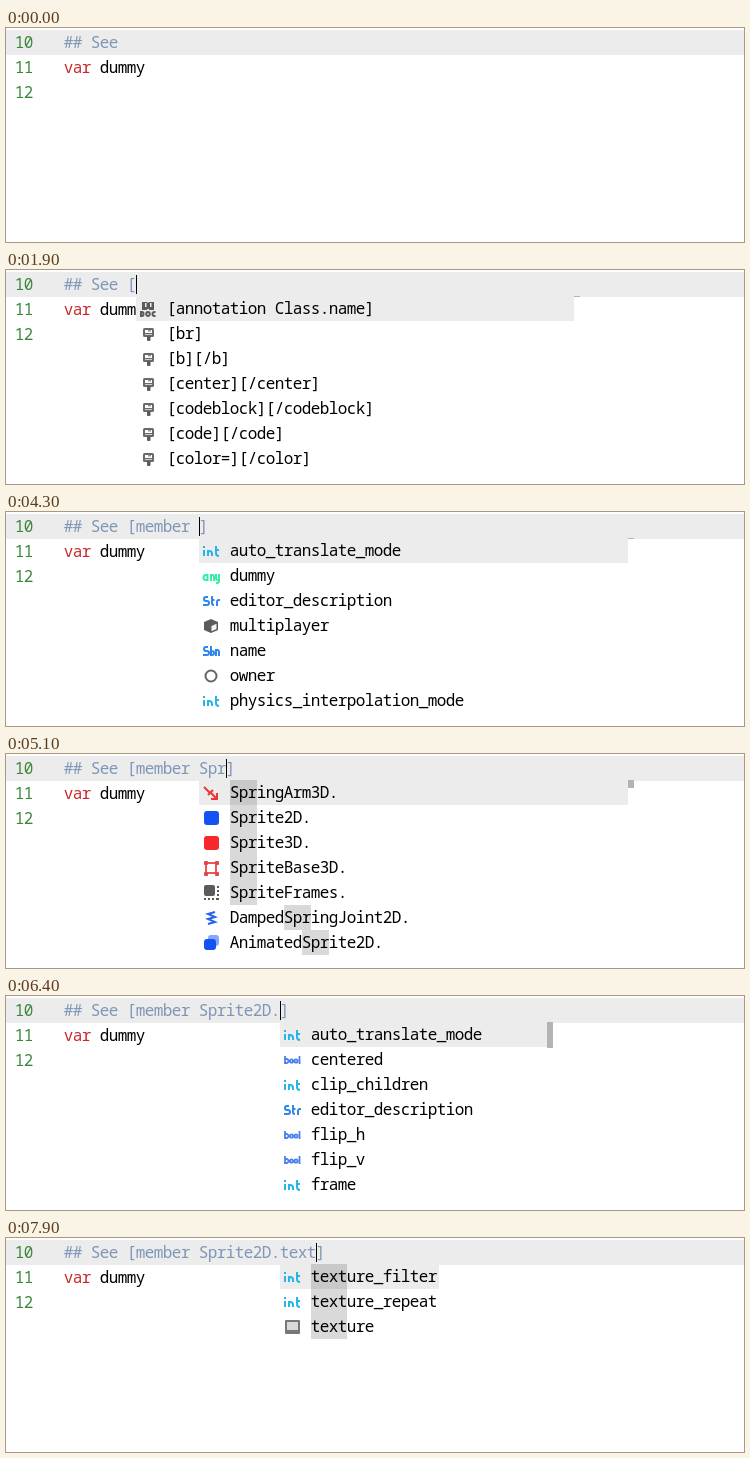
Recreate the animation shown at these times as an HTML page with a canvas. Size 738x214 px, loop 8 s.

```html
<!DOCTYPE html>
<html lang="en">
<head>
<meta charset="utf-8">
<title>Code completion</title>
<style>
html, body { margin: 0; width: 738px; height: 214px; overflow: hidden; background: #fff; }
canvas { display: block; }
</style>
</head>
<body>
<canvas id="stage" width="738" height="214"></canvas>
<script>
const ctx = document.getElementById('stage').getContext('2d');
const LOOP = 8000, CHAR = 9, ROW = 25, LEFT = 58, TOP = 26;
const FONT = 'semi-condensed 16px "Noto Sans Mono", monospace';
const GREY = '#5b5b5b', CYAN = '#25b5e8', BLUE = '#2f86ee', SPRITE = '#1552f5', RED = '#f8272b';

function rect(color, x, y, w, h, r = 0) {
  ctx.fillStyle = color;
  ctx.beginPath();
  ctx.roundRect(x, y, w, h, r);
  ctx.fill();
}
function line(color, d, width = 2) {
  ctx.strokeStyle = color;
  ctx.lineWidth = width;
  ctx.stroke(new Path2D(d));
}
function fill(color, d) {
  ctx.fillStyle = color;
  ctx.fill(new Path2D(d));
}
// Editor text sits on a grid of one cell per character.
function write(text, x, y, color = '#000') {
  ctx.font = FONT;
  ctx.letterSpacing = '0px';
  const spacing = CHAR - ctx.measureText('0').width;
  ctx.letterSpacing = spacing + 'px';
  ctx.fillStyle = color;
  ctx.fillText(text, x + spacing / 2, y);
}

// Each icon fills a 16 by 16 box.
const icons = {
  doc() {
    fill(GREY, 'M2 1h5l1 1 1-1h5v8H9.500L8 7.500 6.500 9H2z');
    rect('#eee', 5, 2, 1.5, 4);
    rect('#eee', 10, 2, 1.5, 4);
    line(GREY, 'M1 11v4h1a1.500 2 0 0 0 0-4zM6.200 13a1.800 2 0 1 0 3.600 0a1.800 2 0 1 0-3.600 0M15.500 11h-1a2 2 0 0 0 0 4h1');
  },
  tag() {
    rect('#6a6a6a', 3, 2, 11, 9, 1.5);
    rect('#fff', 5, 4, 7, 3);
    rect('#999', 8, 4, 3, 1.5);
    rect('#ccc', 5, 8, 7, 1);
    rect(GREY, 7, 10, 3.5, 5, 1);
  },
  cube() {
    fill(GREY, 'M8 1l7 3v8l-7 3-7-3V4z');
    fill('#f4f4f4', 'M8.500 8l5-2.200v5.200l-5 2.200z');
  },
  volume() {
    line(GREY, 'M2 5l3-3h9v9l-3 3H2zM2 5h9v9M11 5l3-3', 1.6);
    fill(GREY, 'M3 13l2.500-4 2 2 1.500-3 1.500 5z');
  },
  int: () => line(CYAN, 'M1 7v6M1 3v2M5 13V8h1a3 3 0 0 1 3 3v2M13 3v7a3 3 0 0 0 3 3M13 7h3'),
  any: () => line('#35eda5', 'M4.500 6v6H3a2 2 0 0 1 0-5H5M8 13V7h1a2 2 0 0 1 2 2v4M13 6v4a2 2 0 0 0 2 2h1M16 6v7a2 2 0 0 1-2 2h-1'),
  str: () => line(BLUE, 'M5 4H3a1.800 1.800 0 0 0 0 4h1a2 2 0 0 1 0 4H0M9 3v7a2 2 0 0 0 2 2M9 7h2.500M14 13V9a2 2 0 0 1 2-2h1'),
  name: () => line(BLUE, 'M5 4H3a1.800 1.800 0 0 0 0 4h1a2 2 0 0 1 0 4H0M8 3v9h1a2 2 0 0 0 0-4H8M13 13V7h1a2 2 0 0 1 2 2v4'),
  bool: () => line('#4b80ed', 'M1 4v7h1.500a1.800 1.800 0 0 0 0-4H1M6 9a1.500 1.700 0 1 0 3 0a1.500 1.700 0 1 0-3 0M10.500 9a1.500 1.700 0 1 0 3 0a1.500 1.700 0 1 0-3 0M15.500 4v7h1', 1.8),
  t2d() {
    line('#7aec2c', 'M0 4h5M2.500 4v9');
    line('#4fb84b', 'M6 4h2a2 2 0 0 1 1 3.500L6.500 12H10');
    line('#a5f52d', 'M12 4v8h1a3.500 4 0 0 0 0-8z');
  },
  prop() {
    rect('#777', 3, 11, 2, 2);
    line('#555', 'M8.500 13V5h2a2 2 0 0 1 0 4.500h-2');
  },
  ring: () => line('#666', 'M2.500 8a5.500 5.500 0 1 0 11 0a5.500 5.500 0 1 0-11 0'),
  texture() {
    rect('#777', 1, 1, 15, 14, 1);
    rect('#d9d9d9', 3, 3, 11, 8);
  },
  arm: () => line('#ee3434', 'M1 2l6 6M5 10l5-5M8 8l5 5M14 8v6H8'),
  sprite2: () => rect(SPRITE, 1, 1, 15, 14, 3),
  sprite3: () => rect(RED, 1, 1, 15, 14, 3),
  base() {
    line('#e85a5a', 'M3 3h10v10H3z');
    for (const x of [1, 12]) for (const y of [1, 12]) rect('#e04848', x, y, 4, 4, 1);
  },
  frames() {
    rect(GREY, 1, 0, 11, 11, 2);
    for (let i = 0; i < 4; i++) {
      rect(GREY, 14, 1 + i * 4, 2, 2);
      rect(GREY, 1 + i * 4, 13, 2, 2);
    }
  },
  spring: () => line('#2763e8', 'M12 2L5 4l7 3-7 2 7 3-7 2'),
  animated() {
    rect('#86a8fa', 5, 0, 11, 11, 3);
    rect(SPRITE, 1, 4, 12, 11, 3);
  }
};

const popup = (x, width, bar, query, items, selected = 0) => ({
  x, width, bar, query, selected,
  items: items.split('|').map(item => item.split(':'))
    .map(([icon, ...rest]) => ({ icon, text: rest.join(':') }))
});

const tags = popup(130, 438, 1, '', 'doc:[annotation Class.name]|tag:[br]|tag:[b][/b]|tag:[center][/center]|tag:[codeblock][/codeblock]|tag:[code][/code]|tag:[color=][/color]');
const tagsM = popup(130, 438, 3, 'm', 'doc:[member Class.name]|doc:[method Class.name]|tag:[img width= height=]res://[/img]|tag:[img]res://[/img]|cube:[ImageFormatLoaderExtension]|cube:[ImageFormatLoader]|volume:[ImageTexture3D]');
const tagsMem = popup(130, 438, 26, 'mem', 'doc:[member Class.name]|doc:[method Class.name]|cube:[ImageFormatLoaderExtension]|cube:[ImageFormatLoader]|cube:[ImmediateMesh]|cube:[NavigationMeshSourceGeometryData2D]|cube:[NavigationMeshSourceGeometryData3D]');
const members = popup(193, 429, 1, '', 'int:auto_translate_mode|any:dummy|str:editor_description|cube:multiplayer|name:name|ring:owner|int:physics_interpolation_mode');
const listS = popup(193, 429, 2, 's', 'str:scene_file_path|cube:script|cube:SceneTree.|ring:Skeleton2D.|ring:Skeleton3D.|arm:SpringArm3D.|sprite2:Sprite2D.');
const listSp = popup(193, 429, 5, 'sp', 'ring:SpinBox.|ring:SplitContainer.|ring:SpotLight3D.|arm:SpringArm3D.|sprite2:Sprite2D.|sprite3:Sprite3D.|base:SpriteBase3D.');
const listSpr = popup(193, 429, 8, 'spr', 'arm:SpringArm3D.|sprite2:Sprite2D.|sprite3:Sprite3D.|base:SpriteBase3D.|frames:SpriteFrames.|spring:DampedSpringJoint2D.|animated:AnimatedSprite2D.');
const props = popup(274, 267, 26, '', 'int:auto_translate_mode|bool:centered|int:clip_children|str:editor_description|bool:flip_h|bool:flip_v|int:frame');
const propsT = popup(274, 267, 35, 't', 'int:texture_filter|int:texture_repeat|texture:texture|bool:top_level|t2d:transform|int:auto_translate_mode|prop:material');
const propsTe = popup(274, 267, 80, 'te', 'int:texture_filter|int:texture_repeat|texture:texture|prop:material|bool:use_parent_material|int:physics_interpolation_mode|bool:top_level');
const textures = 'int:texture_filter|int:texture_repeat|texture:texture';

// Start time, text before the caret, text after it, open list.
const steps = [
  [0, '## See'],
  [200, '## See '],
  [900, '## See ['],
  [1300, '## See [', '', tags],
  [3000, '## See [m', '', tagsM],
  [3200, '## See [mem', '', tagsMem],
  [3900, '## See [member ', ']'],
  [4000, '## See [member ', ']', members],
  [4700, '## See [member S', ']', listS],
  [4900, '## See [member Sp', ']', listSp],
  [5100, '## See [member Spr', ']', listSpr],
  [5800, '## See [member Spr', ']', { ...listSpr, selected: 1 }],
  [6200, '## See [member Sprite2D.', ']'],
  [6300, '## See [member Sprite2D.', ']', props],
  [7200, '## See [member Sprite2D.t', ']', propsT],
  [7300, '## See [member Sprite2D.te', ']', propsTe],
  [7500, '## See [member Sprite2D.tex', ']', popup(274, 159, 0, 'tex', textures)],
  [7900, '## See [member Sprite2D.text', ']', popup(274, 159, 0, 'text', textures)]
];
const caretSpans = [[200, 700], [900, 1400], [1900, 2400], [2900, 3700], [4300, 5600], [6100, 6600], [7000, LOOP]];

// Positions of the query's letters: as one run if possible, else in sequence.
function matches(text, query) {
  const lower = text.toLowerCase(), start = lower.indexOf(query);
  let from = -1;
  return [...query].map((c, i) => start >= 0 ? start + i : (from = lower.indexOf(c, from + 1)));
}

function drawPopup({ x, width, bar, query, selected, items }) {
  rect('#fff', x, TOP + 1, width + (bar ? 6 : 0), items.length * ROW - 1);
  rect('#ececec', x, TOP + selected * ROW, width, ROW);
  if (bar) rect('#b4b4b4', x + width, TOP, 6, bar);
  items.forEach(({ icon, text }, i) => {
    const y = TOP + i * ROW;
    for (const m of matches(text, query)) {
      rect('rgba(0,0,0,.15)', x + 31 + m * CHAR, y, CHAR, ROW);
    }
    ctx.save();
    ctx.translate(x + 4, y + 5);
    icons[icon]();
    ctx.restore();
    write(text, x + 31, y + 18);
  });
}

function draw(t) {
  const [, before, after = '', list] = steps.findLast(step => step[0] <= t);
  rect('#fff', 0, 0, 738, 214);
  rect('#ececec', 0, 2, 738, ROW);
  [10, 11, 12].forEach((n, i) => write(n, 9, 20 + i * ROW, '#3c873c'));
  write(before + after, LEFT, 20, '#7f96b7');
  write('var', LEFT, 45, '#c9282d');
  write('dummy', LEFT + 4 * CHAR, 45);
  if (list) drawPopup(list);
  if (caretSpans.some(([on, off]) => t >= on && t < off)) {
    rect('#000', LEFT + before.length * CHAR, 5, 1, 19);
  }
}

const origin = performance.now();
function tick() {
  draw((performance.now() - origin) % LOOP);
  requestAnimationFrame(tick);
}
tick();
</script>
</body>
</html>
```
